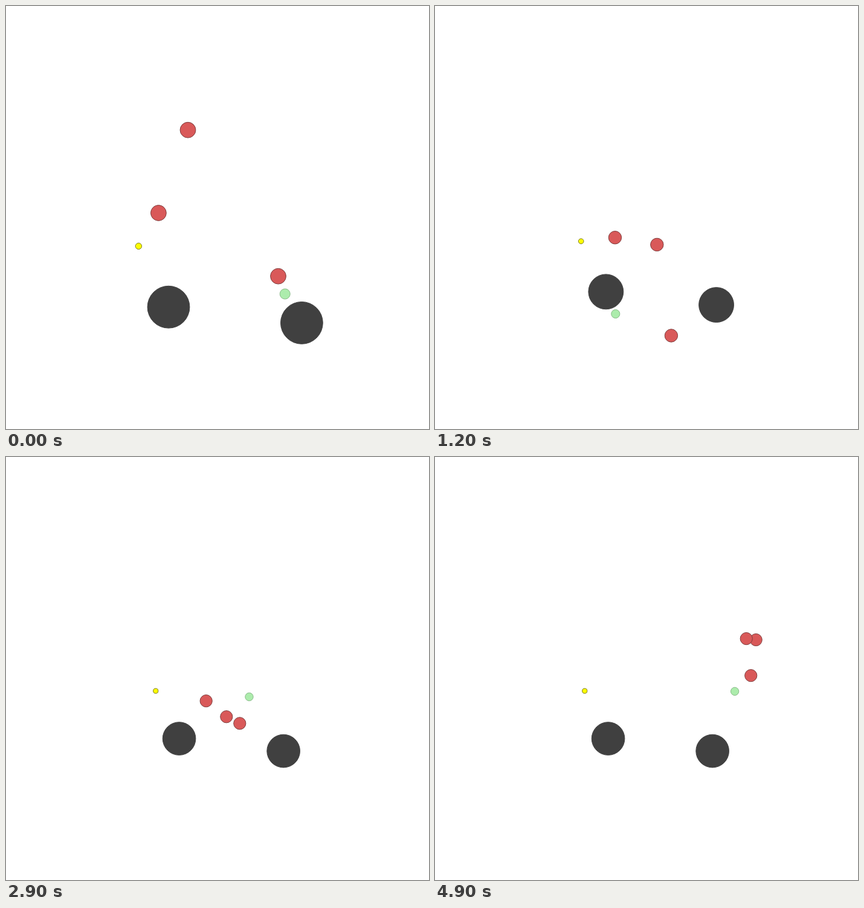
These frames come from a looping animation (700 px wide and 700 px high, 5 s). An HTML page with a canvas:

```html
<!DOCTYPE html>
<html>
<head>
<meta charset="utf-8">
<style>
html, body { margin: 0; height: 100%; overflow: hidden; background: #fff; }
canvas { display: block; width: 100vw; height: 100vh; }
</style>
</head>
<body>
<canvas id="stage" width="700" height="700"></canvas>
<script>
const ctx = document.getElementById('stage').getContext('2d');
const STEP = 100, STEPS = 50, CENTER = 350, START_SPEED = 0.4;

const rock = { r: 34.9, fill: '#404040', line: '#404040' };
const food = { r: 5.2, fill: '#ffff00', line: '#77771c' };
const hunter = { r: 12.9, fill: '#d95959', line: '#7c3c3c' };
const prey = { r: 8.5, fill: '#acecac', line: '#86b886' };

// Waypoints in unzoomed pixels, one for each of these steps.
const times = [0, 8, 16, 24, 33, 41, 49];
const actors = [
  { ...rock, path: [[269, 498.2]] },
  { ...rock, path: [[489.4, 524.4]] },
  { ...food, path: [[219.4, 397.4]] },
  { ...hunter, path: [[450.5, 447.2], [417.4, 528.3], [383.4, 621.8], [367, 531.6],
                      [427.1, 415.4], [471.2, 337], [570.6, 364.9]] },
  { ...hunter, path: [[252.4, 342.5], [362.4, 357.1], [362.4, 456.3], [336.3, 511.2],
                      [403.3, 388], [458.2, 284], [581.4, 289.4]] },
  { ...hunter, path: [[301, 205.2], [301.1, 327], [274.4, 437.1], [283.3, 430.8],
                      [365.9, 397.5], [432, 300.6], [561, 286.9]] },
  { ...prey, path: [[461.7, 476.5], [330.3, 524.5], [276.5, 549.8], [387.6, 513],
                    [439.8, 333], [532.2, 314.5], [536.6, 398.3]] }
];

const clamp = (v, lo, hi) => Math.min(hi, Math.max(lo, v));
const zoomAt = n => clamp(0.989 - 0.04 * (n - 8), 0.783, 1);

// Speed at a waypoint: actors start slowly, then pass through smoothly.
function speed(path, i, axis) {
  const a = Math.max(0, i - 1), b = Math.min(path.length - 1, i + 1);
  const mean = (path[b][axis] - path[a][axis]) / (times[b] - times[a]);
  return i ? mean : START_SPEED * mean;
}

// Cubic Hermite curve through the waypoints.
function along(path, n, axis) {
  if (path.length === 1) return path[0][axis];
  const i = clamp(times.findLastIndex(t => t <= n), 0, times.length - 2);
  const p = path[i][axis], q = path[i + 1][axis], d = times[i + 1] - times[i];
  const u = (n - times[i]) / d, v = 1 - u;
  return v * v * ((1 + 2 * u) * p + u * d * speed(path, i, axis))
       + u * u * ((1 + 2 * v) * q - v * d * speed(path, i + 1, axis));
}

function draw(n) {
  const zoom = zoomAt(n);
  const place = v => CENTER + (v - CENTER) * zoom;
  ctx.clearRect(0, 0, 700, 700);
  for (const { r, fill, line, path } of actors) {
    ctx.beginPath();
    ctx.arc(place(along(path, n, 0)), place(along(path, n, 1)), r * zoom, 0, 2 * Math.PI);
    ctx.fillStyle = fill;
    ctx.fill();
    ctx.strokeStyle = line;
    ctx.stroke();
  }
}

function tick() {
  draw(Math.floor(performance.now() / STEP) % STEPS);
  requestAnimationFrame(tick);
}
tick();
</script>
</body>
</html>
```
